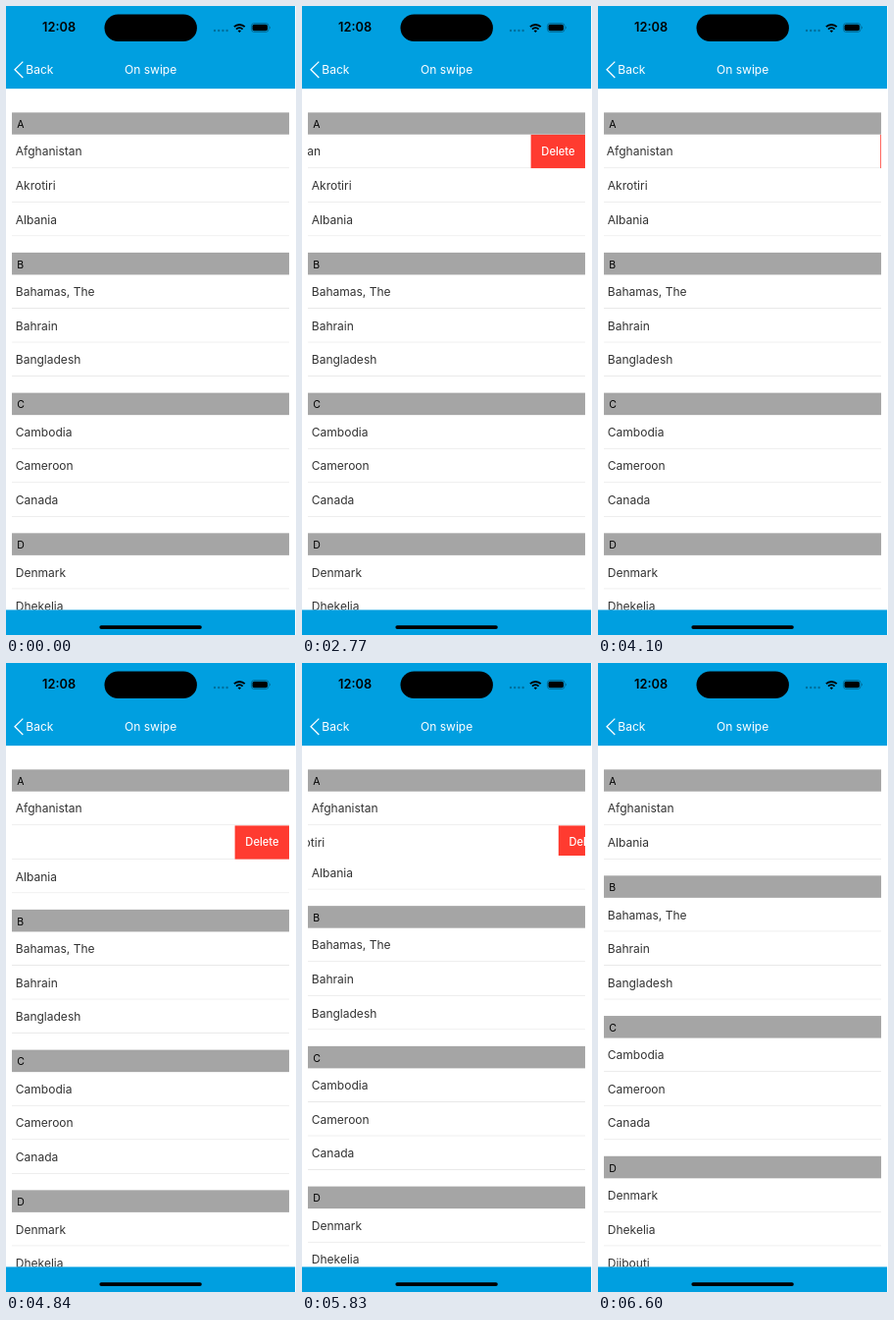
Write an HTML page that moves like this. It is 296 by 640 pixels and loops after 6.62 s.

```html
<!DOCTYPE html>
<html lang="en">
<head>
<meta charset="utf-8">
<title>On swipe</title>
<style>
  html, body { margin: 0; width: 100%; height: 100%; overflow: hidden; background: #fff; }
  /* A 393 x 852 point screen, scaled to 640 px high. */
  .screen { position: absolute; left: 0; top: 0; width: 393px; height: 852px; overflow: hidden;
    transform: scale(.75117); transform-origin: 0 0; font: 16px/1 Inter, Roboto, sans-serif; color: #333; }
  .bar { position: absolute; left: 0; width: 393px; background: #009fe0; }
  .top { top: 0; height: 112px; }
  .bottom { top: 818px; height: 34px; }
  .status { position: absolute; left: 0; top: 0; }
  .label { position: absolute; color: #fff; line-height: 26px; white-space: nowrap; }
  .clock { left: 32px; width: 80px; top: 16px; text-align: center; color: #000; font-size: 17px; font-weight: 600; }
  .back { left: 27px; top: 73px; }
  .title { left: 0; width: 393px; top: 73px; text-align: center; }
  .home { position: absolute; left: 127px; top: 21px; width: 139px; height: 5px; border-radius: 2.5px; background: #000; }
  .list { position: absolute; left: 8px; top: 144px; width: 377px; height: 674px; overflow: hidden; }
  .head { height: 30px; line-height: 31px; padding-left: 7px; font-size: 14px; background: #a5a5a5; color: #000; }
  .row { position: relative; height: 46px; overflow: hidden; }
  .cell { position: relative; height: 46px; box-sizing: border-box; border-bottom: 1px solid #e0e0e0; }
  .name { position: absolute; left: 5px; line-height: 47px; white-space: nowrap; }
  .delete { position: absolute; left: 377px; top: 0; width: 74px; height: 46px; line-height: 47px;
    background: #ff3b30; color: #fff; font-size: 14.8px; font-weight: 500; text-align: center; }
  .gap { height: 22px; }
</style>
</head>
<body>
<div class="screen">
  <div class="list" id="list"></div>
  <div class="bar top">
    <div class="label clock">12:08</div>
    <div class="label back">Back</div>
    <div class="label title">On swipe</div>
  </div>
  <div class="bar bottom"><div class="home"></div></div>
</div>
<svg class="status" width="296" height="84" fill="none">
  <rect x="100.5" y="8.4" width="94.4" height="27.7" rx="13.85" fill="#000"/>
  <g fill="#000" fill-opacity=".3">
    <circle cx="213" cy="25" r="1.2"/><circle cx="217.2" cy="25" r="1.2"/>
    <circle cx="221.4" cy="25" r="1.2"/><circle cx="225.6" cy="25" r="1.2"/>
  </g>
  <path d="M232.9 21.2a7.6 7.6 0 0 1 10.8 0M235 23.6a4.7 4.7 0 0 1 6.6 0" stroke="#000" stroke-width="1.9"/>
  <path d="M236.6 25.2a2.5 2.5 0 0 1 3.4 0L238.3 27z" fill="#000"/>
  <rect x="250.4" y="17.6" width="17.6" height="8.8" rx="2.8" stroke="#000" stroke-opacity=".4" stroke-width=".8"/>
  <rect x="251.5" y="18.7" width="15.4" height="6.6" rx="1.8" fill="#000"/>
  <path d="M269.2 20.6q1.4 1.4 0 2.8z" fill="#000" fill-opacity=".5"/>
  <path d="M17.3 56.6L9 64.8l8.3 8.2" stroke="#fff" stroke-width="1.3"/>
</svg>
<script>
const LOOP = 6620, OPEN = 74, ROW = 46;
const groups = {
  A: ['Afghanistan', 'Akrotiri', 'Albania'],
  B: ['Bahamas, The', 'Bahrain', 'Bangladesh'],
  C: ['Cambodia', 'Cameroon', 'Canada'],
  D: ['Denmark', 'Dhekelia', 'Djibouti']
};
// The screen refreshes only at these moments.
const ticks = [0, 2100, 2220, 2320, 2430, 2540, 2660, 2770, 2880, 2980, 3090,
  3470, 3570, 3670, 3780, 3890, 3990, 4100, 4210, 4330,
  4600, 4710, 4840, 5720, 5830, 5940, 6050];

const list = document.getElementById('list');
function add(parent, className, text = '') {
  const el = document.createElement('div');
  el.className = className;
  el.textContent = text;
  return parent.appendChild(el);
}

const rows = [];
for (const [letter, names] of Object.entries(groups)) {
  add(list, 'head', letter);
  for (const text of names) {
    const el = add(list, 'row');
    const cell = add(el, 'cell');
    rows.push({ el, cell, name: add(cell, 'name', text) });
  }
  add(list, 'gap');
}
const [first, second] = rows;
for (const row of [first, second]) row.button = add(row.cell, 'delete', 'Delete');

const clamp = (v, lo, hi) => Math.min(hi, Math.max(lo, v));

// Critically damped spring from 1 to 0.
function spring(ms) {
  const x = 0.0094 * Math.max(0, ms);
  return (1 + x) * Math.exp(-x);
}

function easeInOut(x) {
  x = clamp(x, 0, 1);
  return x < 0.5 ? 2 * x * x : 1 - 2 * (1 - x) ** 2;
}

function firstShift(t) {
  if (t < 2100 || t >= 4330) return 0;
  if (t >= 3460) return OPEN * spring(t - 3460);
  const x = 0.007 * (t - 2100);
  return OPEN + 93 * x * Math.exp(-x);
}

function secondShift(t) {
  return clamp((t - 4540) * 0.67, 0, OPEN) * spring(t - 5649);
}

// The name may travel past the open position; the button may not.
function slide(row, shift) {
  row.name.style.transform = `translateX(${-shift}px)`;
  row.button.style.transform = `translateX(${-Math.min(OPEN, shift)}px)`;
}

function render(time) {
  const t = ticks.findLast(tick => tick <= time);
  slide(first, firstShift(t));
  slide(second, secondShift(t));
  const left = t >= 6050 ? 0 : 1 - easeInOut((t - 5756) / 330);
  second.el.style.height = ROW * left + 'px';
}

const start = performance.now();
function frame() {
  render((performance.now() - start) % LOOP);
  requestAnimationFrame(frame);
}
frame();
</script>
</body>
</html>
```
